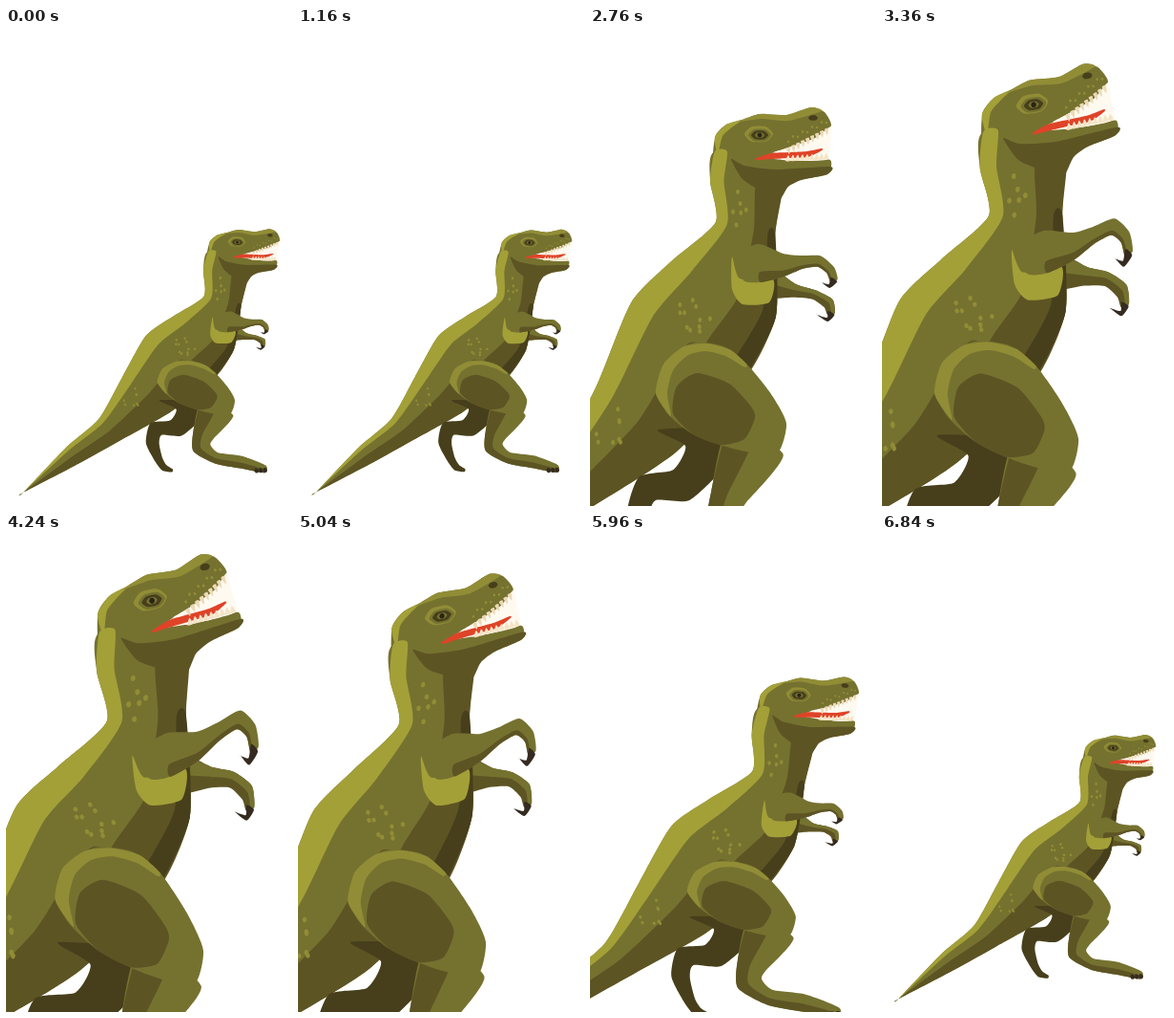
An HTML page with a canvas that plays this animation: 300 by 500 pixels, repeating every 6.88 s.

```html
<!DOCTYPE html>
<html>
<head>
<meta charset="utf-8">
<style>
html, body { margin: 0; width: 100%; height: 100%; overflow: hidden; background: #fff; }
canvas { display: block; }
</style>
</head>
<body>
<canvas id="stage" width="300" height="500"></canvas>
<script>
const ctx = document.getElementById('stage').getContext('2d');
const LOOP = 6880, STEP = 40;
const MID = '#757230', LIGHT = '#a3a038', SOFT = '#918d36', DARK = '#5d5424', DEEP = '#473f1b', CLAW = '#352b20';

const groups = (s, n) => s.split(' ').map(g => g.split(',').map(Number));
const mix = (a, b, k) => a.map((p, i) => p.map((v, j) => v + (b[i][j] - v) * k));
const grow = (pose, k, hipX, hipY) => pose.map(([x, y]) => [hipX + k * (x - 158), hipY + k * (y - 365)]);

// Key points: nose, chin, eye, neck base, throat, two hands, belly, hip, knee, toe, tail tip, rear foot
const small = groups('286,219 284,244 242,224 206,284 246,295 271,306 270,326 219,359 158,366 240,390 273,463 18,486 160,460');
const rest = groups('250,96 252,139 177,112 130,209 194,222 247,240 252,285 163,348 68,373 206,415 255,558 -193,606 55,562');
const tall = groups('226,33 244,83 152,70 104,203 189,196 252,184 255,266 160,350 50,372 207,437 275,600 -260,640 35,597');
const sway = groups('221,52 235,97 150,86 104,206 180,198 238,193 240,264 153,350 51,375 197,428 262,585 -255,635 36,585');
const near = grow(small, 1.24, 124, 365), back = grow(small, 1.4, 101, 366);

const keys = [
  [0, small], [1440, mix(small, near, .09)], [2080, near], [2760, rest],
  [3600, mix(rest, tall, .93)], [4240, tall], [5040, sway], [5960, back], [6480, mix(back, small, .78)]
];

function key(i) {
  const n = keys.length, [t, p] = keys[(i + n) % n];
  return [t + Math.floor(i / n) * LOOP, p];
}

// Cubic Hermite between neighbouring poses
function pose(t) {
  let i = keys.length - 1;
  while (keys[i][0] > t) i--;
  const [[ta, a], [tb, b], [tc, c], [td, d]] = [-1, 0, 1, 2].map(k => key(i + k));
  const h = tc - tb, u = (t - tb) / h, u2 = u * u, u3 = u2 * u;
  return b.map((p, n) => p.map((v, j) => {
    const m0 = (c[n][j] - a[n][j]) / (tc - ta) * h, m1 = (d[n][j] - v) / (td - tb) * h;
    return v * (2 * u3 - 3 * u2 + 1) + m0 * (u3 - 2 * u2 + u) + c[n][j] * (3 * u2 - 2 * u3) + m1 * (u3 - u2);
  }));
}

// Thin-plate spline that carries the rest pose to the current one
const STIFF = 100;
const bend = (x, y) => { const r = x * x + y * y; return r ? r * Math.log(r) / 2 : 0; };
const basis = (x, y) => [...rest.map(([p, q]) => bend(x - p, y - q)), 1, x, y];

function solve(m) {
  const n = m.length;
  for (let c = 0; c < n; c++) {
    let p = c;
    for (let r = c; r < n; r++) if (Math.abs(m[r][c]) > Math.abs(m[p][c])) p = r;
    [m[c], m[p]] = [m[p], m[c]];
    for (let r = 0; r < n; r++) {
      if (r === c) continue;
      const f = m[r][c] / m[c][c];
      for (let k = c; k < n + 2; k++) m[r][k] -= f * m[c][k];
    }
  }
  return m.map((row, i) => [row[n] / row[i], row[n + 1] / row[i]]);
}

function warpTo(target) {
  const m = rest.map(([x, y], i) => {
    const row = basis(x, y);
    row[i] += STIFF;
    return [...row, ...target[i]];
  });
  for (let k = 0; k < 3; k++) m.push([...rest.map(([x, y]) => [1, x, y][k]), 0, 0, 0, 0, 0]);
  const w = solve(m);
  return ([x, y]) => basis(x, y).reduce((s, v, i) => [s[0] + v * w[i][0], s[1] + v * w[i][1]], [0, 0]);
}

const parts = [];
const area = (color, s) => parts.push([color, groups(s)]);

function blob(color, x, y, rx, ry = rx) {
  const ring = [];
  for (let a = 0; a < 6; a++) ring.push([x + rx * Math.cos(a * Math.PI / 3), y + ry * Math.sin(a * Math.PI / 3)]);
  parts.push([color, ring]);
}

// Tapered band along a chain of x,y,radius; lo..hi picks a strip of its width, a..b some of its joints
function limb(color, chain, lo = -1, hi = 1, a = 0, b = chain.length) {
  const edge = k => chain.map(([x, y, r], i) => {
    const p = chain[Math.max(i - 1, 0)], q = chain[Math.min(i + 1, chain.length - 1)];
    const dx = q[0] - p[0], dy = q[1] - p[1], s = k * r / Math.hypot(dx, dy);
    return [x + dy * s, y - dx * s];
  }).slice(a, b);
  parts.push([color, [...edge(lo), ...edge(hi).reverse()]]);
}

const spine = groups('165,130,34 164,161,38 163,210,32 140,273,62 102,327,71 48,410,54 -25,485,28 -98,536,19 -193,606,0');
const nearArm = groups('158,250,14 178,246,20 203,248,12 222,245,7 240,244,6 252,253,5 256,264,4');
const farArm = groups('190,268,14 215,275,7 235,279,5 250,288,6 253,299,4');
const nearLeg = groups('174,432,32 145,491,19 140,518,18 165,537,12 210,543,13 253,555,8');
const farLeg = groups('122,420,50 122,447,24 96,478,18 60,482,15 50,512,12 57,545,8 66,562,7 80,567,3');

limb(DARK, farArm);
limb(MID, farArm, .1, 1);
limb(CLAW, groups('253,298,4 249,305,2 238,300,0'));

// body and tail
limb(MID, spine);
limb(DARK, spine, .05, 1, 4);
limb(DARK, spine, .28, 1, 1, 5);
limb(DEEP, spine, .75, 1, 2, 5);
limb(DEEP, farLeg);

// head
area(MID, '129,132 132,112 143,101 160,96 178,90 206,91 232,83 246,88 253,102 240,115 205,126 178,136 226,139 252,138 249,153 215,159 185,162 150,165 130,160');
limb(LIGHT, spine, -1, -.62);
area(LIGHT, '131,114 143,101 160,96 150,103 139,113 134,132');
area(SOFT, '155,98 178,90 206,91 232,83 243,87 208,97 180,95');
area(DARK, '148,137 162,144 195,148 252,145 249,153 222,159 208,166 198,180 180,171 160,158');

// mouth
area('#fffaf0', '181,135 206,126 236,115 253,103 252,120 250,137 226,139 203,138');
limb('#df4328', groups('175,137,1 190,134,3 210,133,3 228,132,3 243,127,1'));
for (let i = 0; i < 9; i++) {
  const x = 208 + 5 * i, upper = 126 - 2.5 * i, lower = 139 - i / 4;
  parts.push(['#ecd9b5', [[x - 2, upper], [x + 2, upper - 1], [x + 1, upper + 6]]]);
  parts.push(['#f4e4c6', [[x - 3, lower], [x + 2, lower], [x, lower - 6]]]);
  blob(SOFT, x, upper - 7 - i % 2 * 3, 1.3);
}

// eye and nostril
blob(SOFT, 177, 111, 15, 9);
blob(MID, 178, 112, 12, 7);
blob(DEEP, 178, 112, 9, 5);
blob(MID, 178, 112, 5, 3);
blob('#292516', 178, 112, 2.5);
blob(DEEP, 234, 94, 5, 3);

// thigh and near leg
limb(MID, nearLeg);
limb(DARK, nearLeg, -1, -.1);
for (let i = 0; i < 3; i++) blob(CLAW, 237 + 8 * i, 559 - i, 4, 5);
area(MID, '68,373 84,342 110,329 140,333 164,351 190,383 206,414 195,446 150,440 108,425 80,402');
limb(SOFT, groups('84,404,1 75,382,6 82,355,6 100,338,5 122,334,4 145,340,4 163,353,2'));
area(DARK, '91,375 112,361 146,372 169,396 173,408 162,430 137,436 108,425 87,403');

// shoulder and near arm
area(LIGHT, '149,239 157,262 192,263 188,287 160,289 149,273');
limb(MID, nearArm);
limb(DARK, nearArm, -1, -.45, 1);
limb(CLAW, groups('256,263,4 251,270,2 243,266,0'));

// speckles in loose clusters
let seed = 11;
const rnd = () => (seed = seed * 16807 % 2147483647) / 2147483647 * 2 - 1;
for (const [x, y, w, h, count] of [[158, 195, 8, 26, 6], [112, 303, 18, 22, 11], [18, 420, 14, 22, 8]]) {
  for (let i = 0; i < count; i++) blob(SOFT, x + w * rnd(), y + h * rnd(), 2, 2.6);
}

// Closed curve through the points
function shape(points, color) {
  const n = points.length, at = i => points[(i + n) % n];
  const pull = (i, j, k) => at(i)[k] + (at(j + 1)[k] - at(j - 1)[k]) / 9;
  ctx.beginPath();
  ctx.moveTo(...points[0]);
  for (let i = 0; i < n; i++) {
    const p = at(i), q = at(i + 1), l = at(i - 1), r = at(i + 2);
    ctx.bezierCurveTo(p[0] + (q[0] - l[0]) / 9, p[1] + (q[1] - l[1]) / 9,
      q[0] - (r[0] - p[0]) / 9, q[1] - (r[1] - p[1]) / 9, ...q);
  }
  ctx.fillStyle = color;
  ctx.fill();
}

function draw(t) {
  const warp = warpTo(pose(t));
  ctx.fillStyle = '#fff';
  ctx.fillRect(0, 0, 300, 500);
  for (const [color, points] of parts) shape(points.map(warp), color);
}

const start = performance.now();
function tick() {
  const t = (performance.now() - start) % LOOP;
  draw(Math.floor(t / STEP) * STEP);
  requestAnimationFrame(tick);
}
tick();
</script>
</body>
</html>
```
